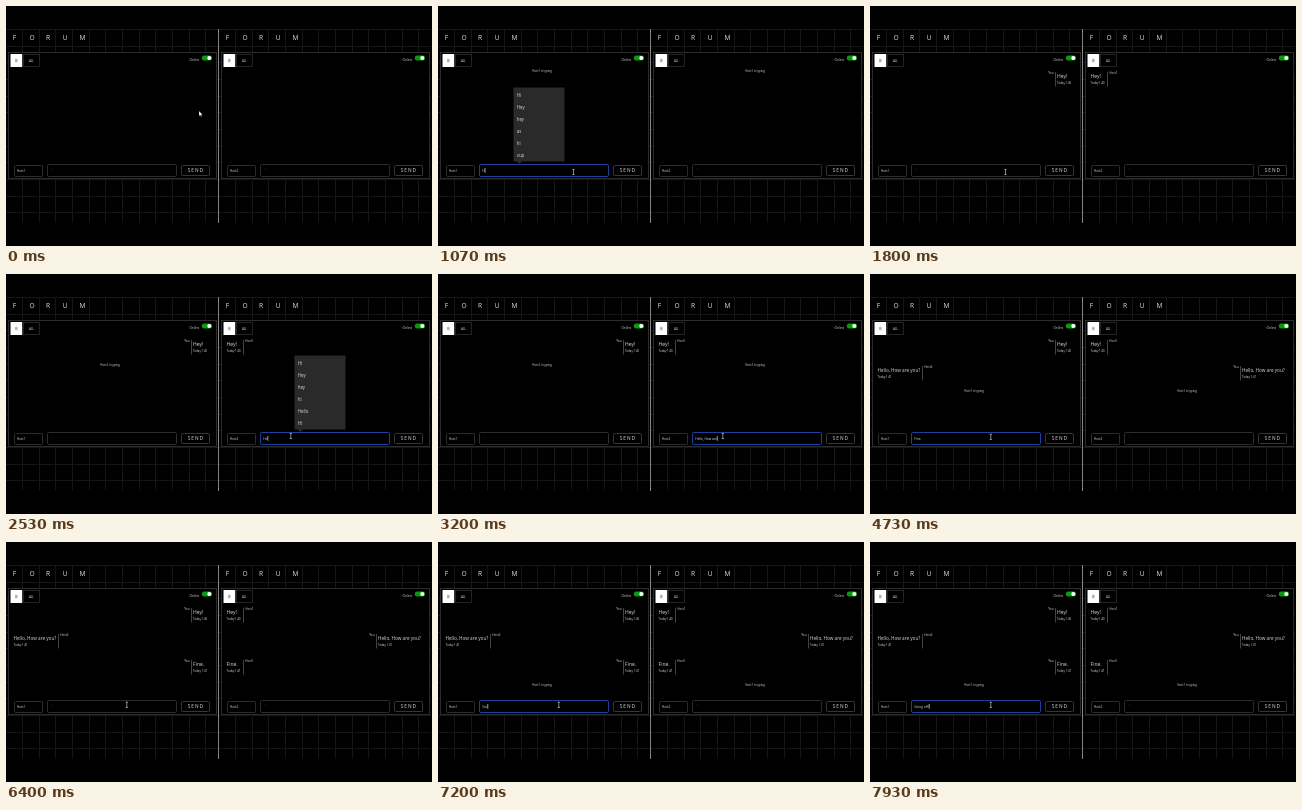
Recreate the animation shown at these times as an HTML page. Size 426 by 240 pixels, loop 8 s.

```html
<!DOCTYPE html>
<html lang="en">
<head>
<meta charset="utf-8">
<title>Two-page chat</title>
<style>
  html, body { margin: 0; width: 100%; height: 100%; overflow: hidden; background: #000; }
  svg { display: block; width: 100vw; height: 100vh; }
  text { font-family: "Open Sans", "Noto Sans", sans-serif; fill: #ddd; white-space: pre; }
</style>
</head>
<body>
<svg id="stage" viewBox="0 0 426 240"></svg>
<script>
const LOOP = 8000, PAGE = 213, CELL = 16.65;
const TOP = 23.5, BOTTOM = 216.5;
const GRID = "#161616", EDGE = "#2c2c2c", BAR = "#555", FOCUS = "#1f3f9c";
const USERS = ["Host1", "Host2"];
const stage = document.getElementById("stage");

function add(parent, tag, attrs, content) {
  const node = document.createElementNS("http://www.w3.org/2000/svg", tag);
  for (const key in attrs) node.setAttribute(key, attrs[key]);
  if (content !== undefined) node.textContent = content;
  parent.appendChild(node);
  return node;
}
const label = (parent, x, y, size, content, extra) =>
  add(parent, "text", { x, y, "font-size": size, ...extra }, content);
const box = (parent, x, y, width, height, extra) =>
  add(parent, "rect", { x, y, width, height, fill: "none", ...extra });
const show = (node, on) => node.setAttribute("visibility", on ? "visible" : "hidden");
const snap = v => Math.floor(v) + .5;

// Who types what, and when
const talk = [
  { page: 0, text: "Hey!", click: 850, start: 1000, step: 160, send: 1700, y: 65.5, time: "1:40",
    listEnd: 1450, list: ["Hi", "Hey", "hey", "as", "hi", "sup"] },
  { page: 1, text: "Hello, How are you?", click: 2300, start: 2460, step: 56, send: 3620, y: 91.5, time: "1:41",
    listEnd: 2700, list: ["Hi", "Hey", "hey", "hi", "Hello", "Hi"] },
  { page: 0, text: "Fine.", click: 3950, start: 4000, step: 50, send: 4870, y: 117.5, time: "1:41" },
  { page: 0, text: "Going off!", click: 6850, start: 7000, step: 95, send: LOOP, y: 143.5 }
];

function buildMessage(parent, line, own) {
  const g = add(parent, "g", {}), y = line.y;
  const wide = line.text.length > 8;
  const barX = own ? (wide ? 157.5 : 185.5) : (wide ? 52.5 : 24.5);
  const textX = own ? barX + 1.6 : 7.6;
  add(g, "line", { x1: barX, x2: barX, y1: y + .5, y2: y + 15, stroke: BAR, "stroke-width": .8 });
  label(g, own ? barX - 2 : barX + 1.7, y + 2.6, 3, own ? "You" : USERS[line.page],
    { "text-anchor": own ? "end" : "start" });
  label(g, textX, y + 6.7, wide ? 4.65 : 5, line.text);
  label(g, textX, y + 12.2, 2.8, "Today " + line.time, { fill: "#bbb" });
  return g;
}

function buildPage(index) {
  const g = add(stage, "g", { transform: `translate(${index * PAGE} 0)` });
  let path = "";
  for (let x = CELL; x < PAGE - 2; x += CELL) path += `M${snap(x)} ${TOP}V${BOTTOM}`;
  for (let y = TOP; y < BOTTOM; y += CELL) path += `M0 ${snap(y)}H${PAGE - 1}`;
  add(g, "path", { d: path, stroke: GRID });

  box(g, 2.5, 46.5, 208, 126, { fill: "#000", stroke: EDGE });
  [..."FORUM"].forEach((c, i) => label(g, 6.8 + i * CELL, 33.7, 6.6, c, { fill: "#b5b5b5" }));

  box(g, 4.5, 48, 11.7, 13, { fill: "#fff" });
  add(g, "path", { d: "M9 53.3H11.6M9 54.5H11.6M9 55.7H11.6", stroke: "#777", "stroke-width": .6 });
  box(g, 17.5, 48.5, 16, 12, { stroke: EDGE, "stroke-width": .8 });
  label(g, 22.9, 55.6, 3, "ALL", { fill: "#bbb" });

  label(g, 183.4, 55.4, 3.2, "Online");
  box(g, 195.8, 49.6, 10.2, 5, { rx: 2.5, fill: "#079a12" });
  add(g, "circle", { cx: 203.3, cy: 52.1, r: 2, fill: "#fff" });

  box(g, 8.5, 159.5, 28, 11, { rx: .8, stroke: EDGE });
  label(g, 11, 165.8, 3.05, USERS[index]);
  const field = box(g, 41.5, 158.5, 129, 12, { rx: 1.2 });
  const hint = label(g, 46, 164.4, 3, "·", { fill: "#888" });
  const typed = label(g, 44.3, 165.6, 3.2, "");
  const caret = add(g, "line", { y1: 162, y2: 166.8, stroke: "#fff", "stroke-width": .6 });
  box(g, 175.5, 159.5, 28, 10, { rx: 1, stroke: "#444", "stroke-width": .8 });
  label(g, 181.7, 166.2, 4.8, "SEND", { "letter-spacing": 1, fill: "#fff" });

  const typing = label(g, 104, 0, 2.85, "", { "text-anchor": "middle", fill: "#a5a5a5" });
  const sent = talk.slice(0, 3).map(line => buildMessage(g, line, line.page === index));
  const menu = add(g, "g", {});
  add(menu, "path", { d: "M75.5 81.5H126.5V155.5H84L81.5 158L79 155.5H75.5Z", fill: "#2a2a2a" });
  const items = Array.from({ length: 6 }, (_, i) => label(menu, 78.8, 90.5 + i * 12, 4.4, "", { fill: "#eee" }));
  return { field, hint, typed, caret, typing, sent, menu, items };
}

const pages = [0, 1].map(buildPage);
add(stage, "line", { x1: 212.5, x2: 212.5, y1: 23, y2: 217, stroke: "#858585" });

const arrow = add(stage, "path", {
  d: "M0 0V5L1.2 4L2 5.7L2.8 5.3L2 3.7H3.6Z", fill: "#fff", stroke: "#000", "stroke-width": .2
});
const beam = add(stage, "path", {
  d: "M-1.2 -2.6H1.2M0 -2.6V2.6M-1.2 2.6H1.2", stroke: "#ddd", "stroke-width": .6
});

const route = [
  [0, 193, 105], [200, 193, 105], [800, 135.5, 166], [1800, 135.5, 166],
  [2250, 284.8, 162], [3550, 284.8, 162], [3930, 120.8, 162.8], [LOOP, 120.8, 162.8]
];
function pointerAt(t) {
  const i = Math.max(1, route.findIndex(stop => stop[0] >= t));
  const [t0, x0, y0] = route[i - 1], [t1, x1, y1] = route[i];
  const p = (t - t0) / (t1 - t0), e = p * p * (3 - 2 * p);
  return [x0 + (x1 - x0) * e, y0 + (y1 - y0) * e];
}

function drawPage(page, index, t) {
  const line = talk.find(l => t >= l.click && t < l.send);
  const mine = line && line.page === index;
  const count = line ? Math.max(0, Math.min(line.text.length, Math.floor((t - line.start) / line.step) + 1)) : 0;

  page.field.setAttribute("stroke", mine ? FOCUS : EDGE);
  page.typed.textContent = mine ? line.text.slice(0, count) : "";
  show(page.hint, !mine || !count);

  const lastKey = mine && (count ? line.start + (count - 1) * line.step : line.click);
  show(page.caret, mine && (t - lastKey) % 1000 < 500);
  if (mine) {
    const x = 44.7 + (count ? page.typed.getComputedTextLength() : 0);
    page.caret.setAttribute("x1", x);
    page.caret.setAttribute("x2", x);
  }

  show(page.typing, count > 0);
  if (count) {
    page.typing.textContent = USERS[line.page] + " is typing";
    page.typing.setAttribute("y", line.y + .8);
  }
  page.sent.forEach((node, i) => show(node, t >= talk[i].send));

  const open = mine && line.list && t < line.listEnd;
  show(page.menu, open);
  page.items.forEach((node, i) => {
    show(node, open);
    if (open) node.textContent = line.list[i];
  });
}

function draw(t) {
  pages.forEach((page, i) => drawPage(page, i, t));
  const [x, y] = pointerAt(t), local = x % PAGE;
  const inField = y > 159 && y < 171 && local > 41 && local < 171;
  show(arrow, !inField);
  show(beam, inField);
  (inField ? beam : arrow).setAttribute("transform", `translate(${x} ${y})`);
}

const began = performance.now();
function tick() {
  draw((performance.now() - began) % LOOP);
  requestAnimationFrame(tick);
}
tick();
</script>
</body>
</html>
```
